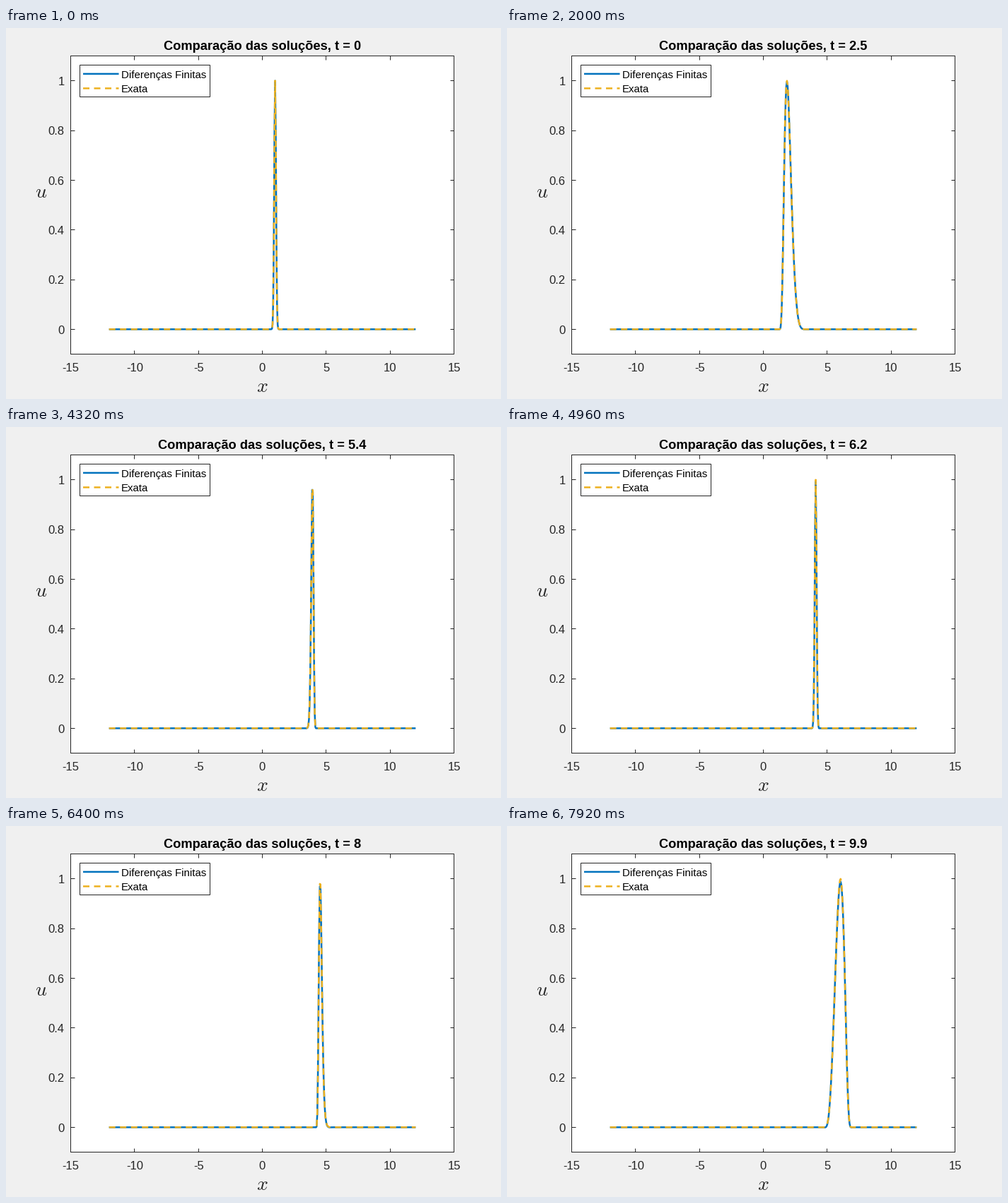
Write a matplotlib script that moves like this. It is 700x525 px and loops after 8000 ms.

```python
import numpy as np
import matplotlib.pyplot as plt
from matplotlib.animation import FuncAnimation
from matplotlib.patches import Rectangle

plt.rcParams.update({
    "font.family": "Liberation Sans",
    "mathtext.fontset": "cm",
    "path.simplify": False,
    "toolbar": "None",
})

W, H, DPI = 700, 525, 100
FRAMES, INTERVAL = 100, 80
BLUE, YELLOW, GRAY = "#0072BD", "#EDB120", "#262626"
LEFT, RIGHT, TOP, BOTTOM = 91.5, 633.5, 39.5, 461.5
LINE = 1.8
DASH = (0, (9 * 0.72 / LINE, 6.5 * 0.72 / LINE))

REFINE = 4
STEP = 0.05 / REFINE
DT = 0.01
STEPS_PER_FRAME = 10
fine_x = np.linspace(-12, 12, 480 * REFINE + 1)
x = fine_x[::REFINE]
speed = 0.2 + np.sin(fine_x - 1) ** 2


def px(v):
    return LEFT + (np.asarray(v) + 15) / 30 * (RIGHT - LEFT)


def py(v):
    return BOTTOM - (np.asarray(v) + 0.1) / 1.2 * (BOTTOM - TOP)


def exact(x, t):
    """Gaussian carried along the characteristics of u_t + c(x) u_x = 0."""
    s = x - 1
    turns = np.round(s / np.pi)
    phase = np.arctan(np.sqrt(6) * np.tan(s - turns * np.pi)) + turns * np.pi
    phase = phase - np.sqrt(0.24) * t
    turns = np.round(phase / np.pi)
    start = np.arctan(np.tan(phase - turns * np.pi) / np.sqrt(6)) + turns * np.pi
    return np.exp(-100 * start ** 2)


def rate(u):
    """Third-order upwind form of -c(x) u_x."""
    slope = 2 * np.roll(u, -1) + 3 * u - 6 * np.roll(u, 1) + np.roll(u, 2)
    return -speed * slope / (6 * STEP)


def advance(u):
    """One third-order Runge-Kutta step."""
    a = u + DT * rate(u)
    b = 0.75 * u + 0.25 * (a + DT * rate(a))
    return u / 3 + 2 / 3 * (b + DT * rate(b))


def solve():
    u = exact(fine_x, 0)
    out = [u[::REFINE]]
    for _ in range(FRAMES - 1):
        for _ in range(STEPS_PER_FRAME):
            u = advance(u)
        out.append(u[::REFINE])
    return out


numeric = solve()

fig = plt.figure(figsize=(W / DPI, H / DPI), dpi=DPI, facecolor="#f0f0f0")
ax = fig.add_axes([0, 0, 1, 1])
ax.set_xlim(0, W)
ax.set_ylim(H, 0)
ax.axis("off")


# Hairlines are centred on half pixels; the shift keeps snapping on that pixel.
def box(x0, y0, x1, y1, **style):
    ax.add_patch(Rectangle((x0 - 0.4, y0 - 0.4), x1 - x0, y1 - y0, lw=0.72,
                           **style))


def hairline(xs, ys):
    ax.plot(np.array(xs) - 0.4, np.array(ys) - 0.4, color=GRAY, lw=0.72,
            solid_capstyle="butt", zorder=1)


def curve(xs, ys, color, **style):
    return ax.plot(xs, ys, color=color, lw=LINE, solid_capstyle="butt",
                   dash_capstyle="butt", snap=False, **style)[0]


def label(x, baseline, text, size=12, ha="center", color=GRAY, **style):
    return ax.text(x, baseline, text, fontsize=size, ha=ha, va="baseline",
                   color=color, **style)


box(LEFT, TOP, RIGHT, BOTTOM, fc="white", ec="none", zorder=0)

for v in range(-15, 16, 5):
    p = px(v)
    label(p, 486, str(v))
    for edge, inward in ((TOP, 5.4), (BOTTOM, -5.4)):
        hairline([p, p], [edge, edge + inward])

for v in np.arange(6) / 5:
    p = py(v)
    label(82.7, p + 6.4, f"{v:g}", ha="right")
    for edge, inward in ((LEFT, 5.4), (RIGHT, -5.4)):
        hairline([edge, edge + inward], [p, p])

box(LEFT, TOP, RIGHT, BOTTOM, fc="none", ec=GRAY, zorder=1)

label(362.5, 515, "$x$", 20)
label(49.2, 240, "$u$", 20)
title = label(362.5, 31, "", 13.15, color="black", weight="bold")

numeric_line = curve([], [], BLUE, zorder=3)
exact_line = curve([], [], YELLOW, ls=DASH, zorder=4)

box(104.5, 52.5, 288.5, 97.5, fc="white", ec=GRAY, zorder=5)
curve([109, 159.5], [64.9, 64.9], BLUE, zorder=6)
curve([109, 159.5], [85.4, 85.4], YELLOW, ls=DASH, zorder=6)
label(163, 71, "Diferenças Finitas", 10.8, "left", "black", zorder=6)
label(163, 91, "Exata", 10.8, "left", "black", zorder=6)


def update(frame):
    t = frame / 10
    numeric_line.set_data(px(x), py(numeric[frame]))
    exact_line.set_data(px(x), py(exact(x, t)))
    title.set_text(f"Comparação das soluções, t = {t:g}")
    return numeric_line, exact_line, title


anim = FuncAnimation(fig, update, frames=FRAMES, interval=INTERVAL,
                     repeat=True, repeat_delay=0, blit=False)
plt.show()
```
